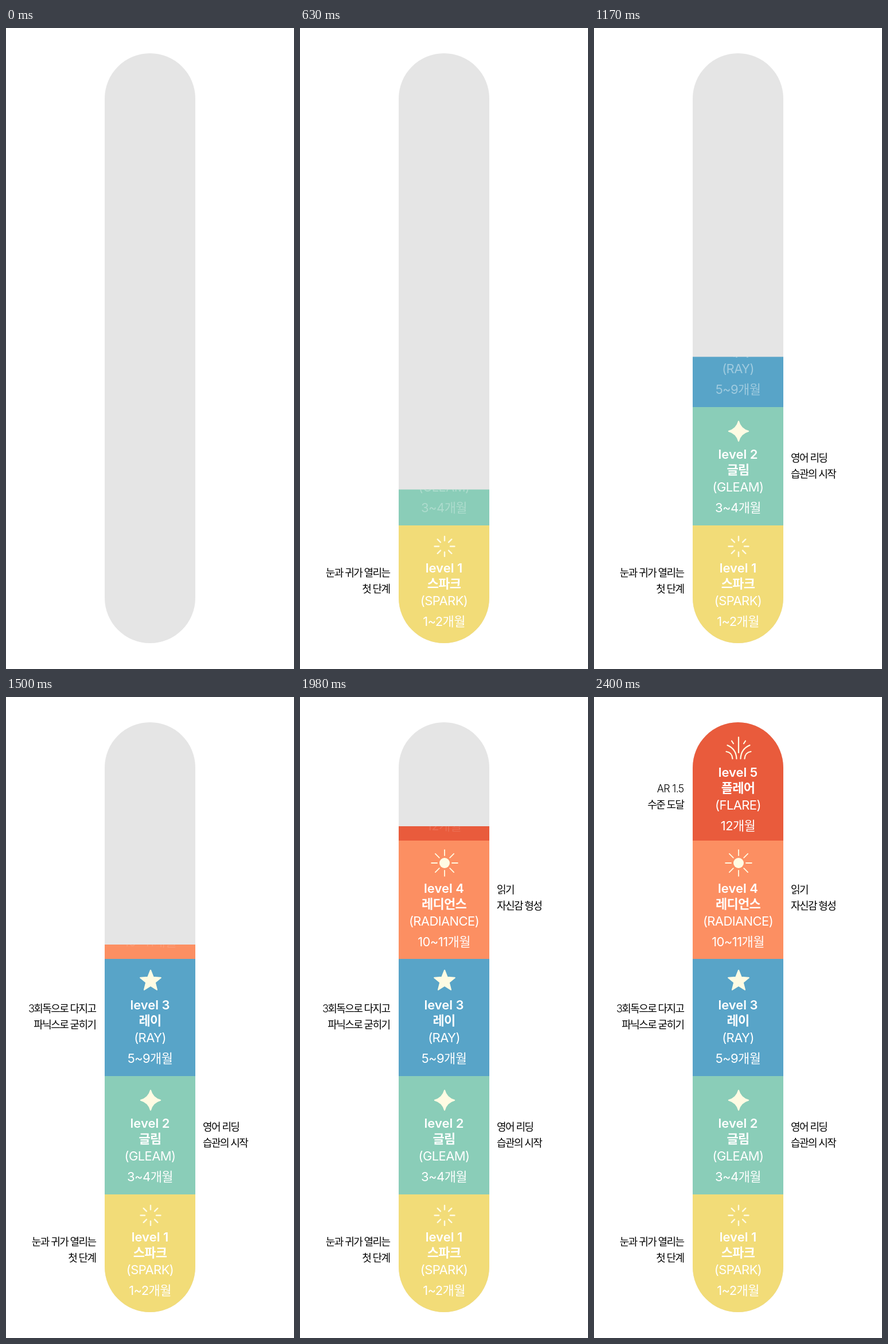
An HTML page with a canvas for the animation above (4.73 s loop, 502 by 1116 pixels).

```html
<!DOCTYPE html>
<html lang="ko">
<head>
<meta charset="utf-8">
<title>Reading levels</title>
<style>
  html, body { margin: 0; width: 100%; height: 100%; overflow: hidden; background: #fff; }
  canvas { display: block; width: 502px; height: 1116px; }
</style>
</head>
<body>
<canvas id="stage"></canvas>
<script>
const W = 502, H = 1116, LOOP = 4730, STEP = 30, RISE = 478;
const BAR = { x: 172, y: 44, w: 158, h: 1027 };
const MID = 251;
const FONT = 'Inter, "Noto Sans CJK KR", "Noto Sans CJK", sans-serif';
const CREAM = '#fffbe3';

const canvas = document.getElementById('stage');
const ctx = canvas.getContext('2d');
const dpr = window.devicePixelRatio || 1;
canvas.width = W * dpr;
canvas.height = H * dpr;

const clamp = v => Math.max(0, Math.min(1, v));

function line(x1, y1, x2, y2) {
  ctx.beginPath();
  ctx.moveTo(x1, y1);
  ctx.lineTo(x2, y2);
  ctx.stroke();
}

function rays(inner, outer, width) {
  ctx.lineWidth = width;
  for (let i = 0; i < 8; i++) {
    const c = Math.cos(i * Math.PI / 4), s = Math.sin(i * Math.PI / 4);
    line(c * inner, s * inner, c * outer, s * outer);
  }
}

function solid() {
  ctx.closePath();
  ctx.lineWidth = 2;
  ctx.fill();
  ctx.stroke();
}

// Icons are drawn around their own centre.
function spark() {
  rays(10, 17.4, 2.4);
}

function gleam() {
  const r = 17.2, k = 3.6;
  ctx.beginPath();
  ctx.moveTo(0, -r);
  ctx.quadraticCurveTo(k, -k, r, 0);
  ctx.quadraticCurveTo(k, k, 0, r);
  ctx.quadraticCurveTo(-k, k, -r, 0);
  ctx.quadraticCurveTo(-k, -k, 0, -r);
  solid();
}

function star() {
  ctx.beginPath();
  for (let i = 0; i < 10; i++) {
    const r = i % 2 ? 8.2 : 18.8, a = i * Math.PI / 5;
    ctx.lineTo(r * Math.sin(a), -r * Math.cos(a));
  }
  solid();
}

function sun() {
  ctx.beginPath();
  ctx.arc(0, 0, 9, 0, Math.PI * 2);
  ctx.fill();
  rays(13, 22.8, 1.8);
}

function flare() {
  ctx.lineWidth = 2.2;
  line(0, -19, 0, 8);
  for (const side of [-1, 1]) {
    ctx.save();
    ctx.scale(side, 1);
    line(9, -8, 12, -12.5);
    ctx.beginPath();
    ctx.moveTo(19.5, -5);
    ctx.bezierCurveTo(10, -1, 4, 6, 3.5, 18.5);
    ctx.moveTo(21.5, 6);
    ctx.bezierCurveTo(15, 7, 11, 11, 10.5, 18.5);
    ctx.stroke();
    ctx.restore();
  }
}

const levels = [
  { start: 6, bottom: 1071, top: 866, color: '#f2dc78', y: 940, icon: spark, iconY: 902.5,
    name: '스파크', word: '(SPARK)', months: '1~2개월', side: -1, noteY: 948.5, note: ['눈과 귀가 열리는', '첫 단계'] },
  { start: 485, bottom: 866, top: 660, color: '#8acdb8', y: 742, icon: gleam, iconY: 702,
    name: '글림', word: '(GLEAM)', months: '3~4개월', side: 1, noteY: 749, note: ['영어 리딩', '습관의 시작'] },
  { start: 965, bottom: 660, top: 456, color: '#58a4c8', y: 536, icon: star, iconY: 494.5,
    name: '레이', word: '(RAY)', months: '5~9개월', side: -1, noteY: 543, note: ['3회독으로 다지고', '파닉스로 굳히기'] },
  { start: 1442, bottom: 456, top: 250, color: '#fc8f62', y: 333, icon: sun, iconY: 289,
    name: '레디언스', word: '(RADIANCE)', months: '10~11개월', side: 1, noteY: 335.5, note: ['읽기', '자신감 형성'] },
  { start: 1922, bottom: 250, top: 44, color: '#e95b3c', y: 131, icon: flare, iconY: 89,
    name: '플레어', word: '(FLARE)', months: '12개월', side: -1, noteY: 160, note: ['AR 1.5', '수준 도달'] }
];

function write(text, x, y, weight, size, spacing, align) {
  ctx.font = `${weight} ${size}px ${FONT}`;
  ctx.letterSpacing = spacing + 'px';
  ctx.textAlign = align;
  ctx.fillText(text, x, y);
}

function drawBlock(level, index, p) {
  const edge = level.bottom + (level.top - level.bottom) * p;
  ctx.save();
  ctx.beginPath();
  ctx.rect(BAR.x, edge, BAR.w, level.bottom - edge);
  ctx.clip();
  ctx.fillStyle = level.color;
  ctx.fillRect(BAR.x, level.top, BAR.w, level.bottom - level.top);

  ctx.globalAlpha = p;
  ctx.fillStyle = '#fff';
  write('level ' + (index + 1), MID, level.y + 8, 600, 22, 0, 'center');
  write(level.name, MID, level.y + 34.5, 700, 22, -0.7, 'center');
  write(level.word, MID, level.y + 65, 400, 22, -0.6, 'center');
  write(level.months, MID, level.y + 100.5, 400, 22, -0.6, 'center');

  ctx.translate(252, level.iconY);
  ctx.fillStyle = ctx.strokeStyle = CREAM;
  ctx.lineCap = ctx.lineJoin = 'round';
  level.icon();
  ctx.restore();
}

function drawNote(level, p) {
  ctx.globalAlpha = clamp((p - 0.47) / 0.53);
  ctx.fillStyle = '#000';
  const left = level.side > 0;
  level.note.forEach((text, i) => {
    const spacing = /[가-힣]/.test(text) ? -1.6 : -0.7;
    write(text, left ? 343 : 156.5, level.noteY + 6 + i * 28, 300, 18, spacing, left ? 'left' : 'right');
  });
  ctx.globalAlpha = 1;
}

function draw(time) {
  ctx.setTransform(dpr, 0, 0, dpr, 0, 0);
  ctx.fillStyle = '#fff';
  ctx.fillRect(0, 0, W, H);

  const progress = levels.map(level => clamp((time - level.start) / RISE));

  ctx.save();
  ctx.beginPath();
  ctx.roundRect(BAR.x, BAR.y, BAR.w, BAR.h, BAR.w / 2);
  ctx.fillStyle = '#e5e5e5';
  ctx.fill();
  ctx.clip();
  levels.forEach((level, i) => progress[i] > 0 && drawBlock(level, i, progress[i]));
  ctx.restore();

  levels.forEach((level, i) => drawNote(level, progress[i]));
}

const origin = performance.now();
function tick() {
  const t = (performance.now() - origin) % LOOP;
  draw(Math.floor(t / STEP) * STEP);
  requestAnimationFrame(tick);
}
tick();
</script>
</body>
</html>
```
